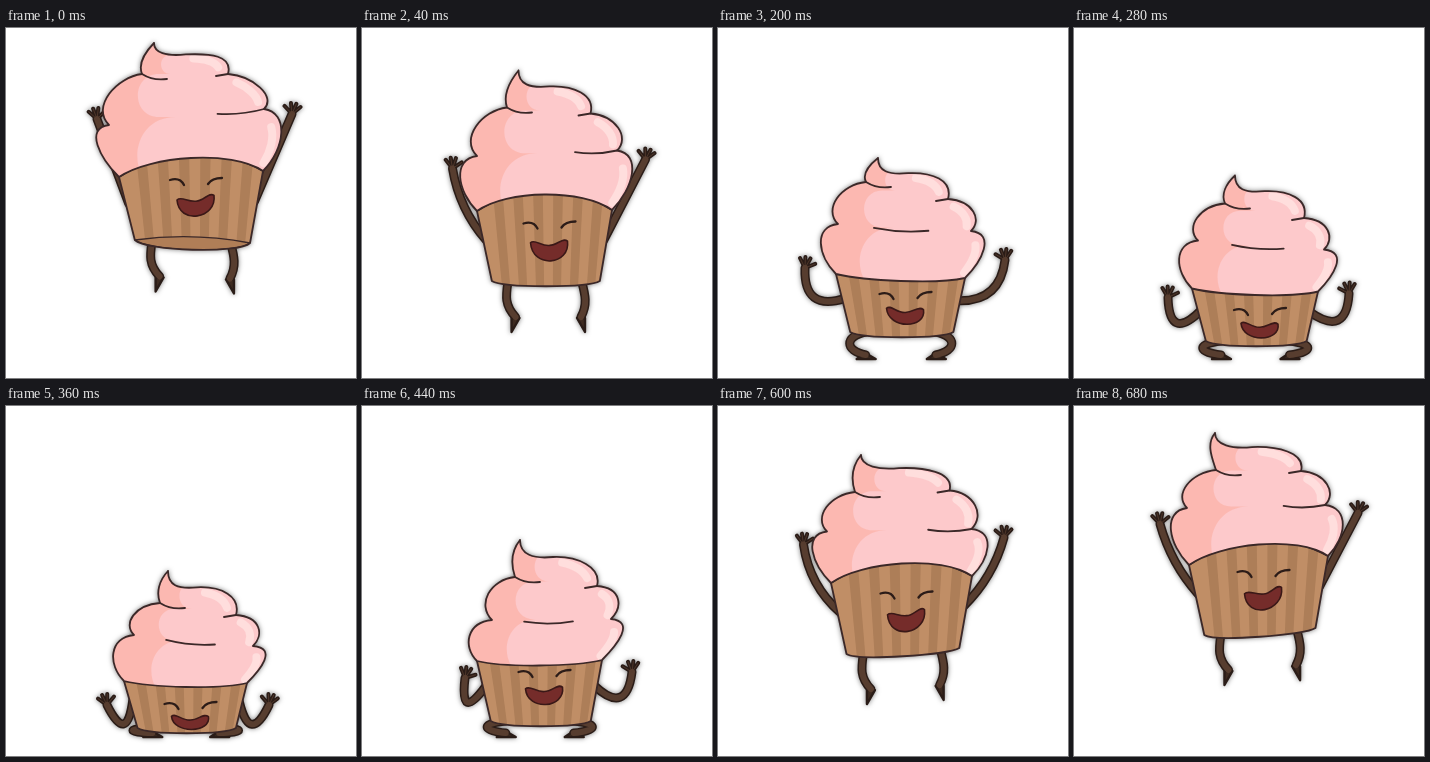
An HTML page that plays this animation: 350x350 px, repeating every 800 ms.

```html
<!DOCTYPE html>
<html lang="en">
<head>
<meta charset="utf-8">
<title>Jumping cupcake</title>
<style>
html, body { margin: 0; width: 100%; height: 100%; overflow: hidden; background: #fff; }
svg { display: block; width: 100%; height: 100%; }
#cake { filter: drop-shadow(0 0 2.8px rgba(0, 0, 0, .5)); }
path { stroke-linecap: round; stroke-linejoin: round; }
.line { fill: none; stroke: #3b2828; stroke-width: 1.8; }
.edge { fill: none; stroke: #2a1c17; }
.skin { fill: none; stroke: #573d2f; }
.shine { fill: none; stroke: #ffdedd; stroke-width: 8; stroke-dasharray: 50 300; stroke-dashoffset: -30; }
</style>
</head>
<body>
<svg viewBox="0 0 350 350">
  <defs>
    <clipPath id="iceClip"><path id="iceMask"/></clipPath>
    <clipPath id="cupClip"><path id="cupMask"/></clipPath>
  </defs>
  <g id="cake">
    <path id="limbEdge" class="edge" stroke-width="9"/>
    <path id="tipEdge" class="edge" stroke-width="4"/>
    <path id="feet" stroke="#2a1c17" stroke-width="2.4" fill="#3d2a20"/>
    <path id="limbSkin" class="skin" stroke-width="6"/>
    <path id="tipSkin" class="skin" stroke-width=".8"/>
    <path id="cup" fill="#c08e66"/>
    <g clip-path="url(#cupClip)">
      <path id="stripes" fill="#ad7e58"/>
      <path id="rim" fill="#b07e57" stroke="#3b2828" stroke-width="1.4"/>
    </g>
    <path id="cupLine" class="line"/>
    <path id="ice" fill="#fcb8b1"/>
    <g clip-path="url(#iceClip)">
      <path id="light" fill="#fdc9cb"/>
      <g transform="translate(-9 4)">
        <path id="shine0" class="shine" pathLength="100"/>
        <path id="shine1" class="shine" pathLength="100"/>
        <path id="shine2" class="shine" pathLength="100"/>
      </g>
    </g>
    <path id="iceLine" class="line"/>
    <path id="crease" class="line"/>
    <path id="eyes" class="line" style="stroke-width:2.3;stroke:#2c1c18"/>
    <path id="mouth" fill="#752c2a" stroke="#3a1817" stroke-width="1.6"/>
  </g>
</svg>
<script>
// right, left: the two notches between the icing tiers, upper one first
// cup: top left, top right, height of each side; hands: both palms
const peak = {
  tip: [148, 15], right: [222, 46, 258, 81], left: [136, 46, 103, 97],
  cup: [113, 149, 257, 143, 63, 72], hands: [91, 91, 286, 86], eyes: [154]
};
const land = {
  tip: [165, 70], right: [235, 125, 252, 164], left: [154, 113, 127, 159],
  cup: [117, 217, 243, 221, 77, 70], hands: [90, 190, 281, 177], eyes: [241]
};
const squat = {
  tip: [160, 130], right: [230, 171, 253, 203], left: [148, 154, 120, 196],
  cup: [118, 246, 247, 250, 58, 54], hands: [87, 240, 287, 232], eyes: [268]
};
const crouch = {
  tip: [162, 165], right: [230, 209, 247, 240], left: [154, 197, 128, 229],
  cup: [118, 275, 241, 277, 47, 45], hands: [101, 299, 263, 299], eyes: [300]
};
const push = {
  tip: [158, 134], right: [235, 180, 249, 213], left: [153, 171, 130, 214],
  cup: [115, 255, 240, 254, 60, 61], hands: [103, 272, 270, 266], eyes: [268]
};
const leap = {
  tip: [145, 71], right: [236, 104, 256, 147], left: [132, 108, 105, 149],
  cup: [111, 195, 254, 190, 72, 72], hands: [85, 159, 288, 156], eyes: [211]
};
const hang = {
  tip: [141, 27], right: [227, 65, 251, 99], left: [142, 64, 113, 102],
  cup: [115, 159, 254, 150, 70, 72], hands: [86, 118, 284, 107], eyes: [168]
};

const mid = (a, b) => (a + b) / 2;
const mix = (a, b, u) => a + (b - a) * u;
const clamp = v => Math.max(0, Math.min(1, v));
const add = (p, x, y) => [p[0] + x, p[1] + y];
const move = p => 'M' + p;
const curve = (...pts) => (pts.length > 2 ? 'C' : 'Q') + pts.join(' ');
const el = id => document.getElementById(id);
const draw = (d, ...ids) => ids.forEach(id => el(id).setAttribute('d', d));

function blend(a, b) {
  const out = {};
  for (const key in a) out[key] = a[key].map((v, i) => mid(v, b[key][i]));
  return out;
}

const steps = [
  [0, peak], [40, blend(peak, land)], [120, land], [200, squat], [280, blend(squat, crouch)],
  [360, crouch], [440, push], [520, leap], [600, blend(leap, hang)], [680, hang]
];

// Named points of the body; lift tells how far the cup is seen from below
function build(p) {
  const [x0, y0, x1, y1, hl, hr] = p.cup, w = x1 - x0;
  const tl = [x0, y0], tr = [x1, y1];
  const bl = [x0 + w * .11, y0 + hl], br = [x1 - w * .09, y1 + hr];
  const base = mid(bl[1], br[1]);
  const lift = clamp((292 - base) / 28);
  return {
    tip: p.tip, tl, tr, bl, br, w, lift,
    rights: [p.right.slice(0, 2), p.right.slice(2), tr],
    lefts: [p.left.slice(0, 2), p.left.slice(2), tl],
    hands: [p.hands.slice(0, 2), p.hands.slice(2)],
    height: mid(hl, hr), arch: 5 - 21 * lift, rim: clamp((222 - base) / 6),
    face: [mid(x0, x1) + 5, p.eyes[0]], tilt: (y1 - y0) * .3
  };
}

// The arm bends outwards by the length that the reach leaves over
function arm(from, hand, side) {
  const dx = hand[0] - from[0], dy = hand[1] - from[1], d = Math.hypot(dx, dy);
  const bow = .55 * Math.sqrt(Math.max(0, 82 * 82 - d * d)) / d;
  const elbow = [mid(from[0], hand[0]) - side * dy * bow, mid(from[1], hand[1]) + side * dx * bow];
  const dir = Math.atan2(hand[1] - elbow[1], hand[0] - elbow[0]);
  const fingers = [-.5, 0, .48, -1.15 * side].map(turn => move(hand) +
    'L' + add(hand, 11 * Math.cos(dir + turn), 11 * Math.sin(dir + turn)));
  return { limb: move(from) + curve(elbow, hand), fingers: fingers.join('') };
}

// Knees bow out while the feet stand; in the air the legs dangle
function leg(hip, side) {
  const gap = 327 - hip[1];
  if (gap > 52) {
    const ankle = add(hip, 3.5 - side * 4, 36);
    return {
      limb: move(hip) + curve(add(hip, 1 + side * 3, 14), add(hip, 1 + side * 5, 24), ankle),
      foot: move(add(ankle, -4, 1)) + 'L' + add(ankle, side * 4, 15) + 'L' + add(ankle, 4, 1) + 'Z'
    };
  }
  const bow = side * Math.sqrt(Math.max(0, 40 * 40 - gap * gap)) * .65;
  const ankle = [hip[0], 327];
  return {
    limb: move(hip) + curve(add(hip, bow, gap * .2), add(ankle, bow, -gap * .2), ankle),
    foot: move(add(ankle, -3, 0)) + 'L' + add(ankle, -9, 4) + 'L' + add(ankle, 10, 4) + 'L' + add(ankle, 3, 0) + 'Z'
  };
}

function drawLimbs(b) {
  const at = (p, q, u) => [mix(p[0], q[0], u), mix(p[1], q[1], u)];
  const arms = [arm(add(at(b.tl, b.bl, .42), 3, 0), b.hands[0], -1),
    arm(add(at(b.tr, b.br, .42), -3, 0), b.hands[1], 1)];
  const legs = [leg(at(b.bl, b.br, .15), -1), leg(at(b.bl, b.br, .83), 1)];
  draw([...arms, ...legs].map(l => l.limb).join(''), 'limbEdge', 'limbSkin');
  draw(arms.map(a => a.fingers).join(''), 'tipEdge', 'tipSkin');
  draw(legs.map(l => l.foot).join(''), 'feet');
}

function drawCup(b) {
  const { tl, tr, bl, br } = b, sag = 7 + b.rim * 4;
  const base = curve(add(br, -11, sag), add(bl, 11, sag), bl);
  const top = [mid(tl[0], tr[0]), mid(tl[1], tr[1]) + b.arch * 2 - 10];
  draw(move(tl) + curve(top, tr) + 'L' + br + base + 'Z', 'cup', 'cupMask', 'cupLine');

  let bands = '';
  for (let u = .1; u < .95; u += .155) {
    const x = (p, q, v) => mix(p[0], q[0], v);
    bands += `M${x(tl, tr, u)} ${top[1]}H${x(tl, tr, u + .075)}` +
      `L${x(bl, br, u + .075)} ${bl[1] + 12}H${x(bl, br, u)}Z`;
  }
  draw(bands, 'stripes');
  draw(move(bl) + curve([mid(bl[0], br[0]), bl[1] - 8], br) + base + 'Z', 'rim');
  el('rim').setAttribute('opacity', b.rim);
}

// One side of an icing tier, from its upper to its lower notch
function lobe(up, low, side) {
  const h = low[1] - up[1];
  return [up, add(up, 25 * side, h * .06), add(low, .36 * h * side, -.36 * h), low];
}

function drawIce(b) {
  const { tip, rights: [r1, r2, r3], lefts: [l1, l2, l3] } = b;
  const dy = r1[1] - tip[1], rise = l1[1] - tip[1];
  const crest = [mix(tip[0], r1[0], .43), mix(tip[1], r1[1], .37)];
  const hem = b.arch * 4 / 3;
  const sides = [
    [crest, add(crest, 24, -1), add(r1, 5, -19), r1],
    lobe(r1, r2, 1), lobe(r2, r3, 1)
  ];
  const shape = move(tip) + curve(add(tip, 0, dy * .32), add(crest, -20, 2), crest) +
    sides.map(s => curve(...s.slice(1))).join('') +
    curve(add(r3, -b.w * .22, hem), add(l3, b.w * .22, hem), l3) +
    [lobe(l2, l3, -1), lobe(l1, l2, -1)].map(s => curve(s[2], s[1], s[0])).join('') +
    curve(add(l1, -4, -rise * .33), add(tip, -9, rise * .3), tip);
  draw(shape, 'ice', 'iceMask', 'iceLine');
  sides.forEach((s, i) => draw(move(s[0]) + curve(...s.slice(1)), 'shine' + i));

  const fold = u => [mix(l2[0], r2[0], u), mix(l2[1], r2[1], u) + 2 * (1 - b.lift)];
  const from = .27 + .43 * b.lift, to = .68 + .32 * b.lift;
  draw(move(l1) + curve(add(l1, 11, 7), add(l1, 25, 5)) +
    move(fold(from)) + curve(add(fold(mid(from, to)), 0, 4), fold(to)) +
    move(r1) + curve(add(r1, -6, 1), add(r1, -12, 2)), 'crease');

  const starts = [l1[0] + 18, mid(l1[0], l2[0]) + 10, mid(l2[0], l3[0]) + 19];
  const levels = [tip[1] + 12, mid(l1[1], r1[1]), mid(l2[1], r2[1]), Math.max(l3[1], r3[1]) + 18];
  draw(starts.map((x, i) => {
    const y = levels[i], low = levels[i + 1], r = (low - y) * .55;
    return `M310 ${y}H${x + r}` + curve([x - r * .2, y], [x - r * .2, low], [x + r, low]) + 'H310Z';
  }).join(''), 'light');
}

function drawFace(b) {
  const c = b.face, drop = b.height * .24, deep = b.height * .33;
  draw(move(add(c, -26, -2)) + 'q10 -3 14 5' + move(add(c, 12, 2)) + 'q4 -6 14 -6', 'eyes');
  const m = add(c, 0, drop), a = add(m, -19, -b.tilt), z = add(m, 19, b.tilt);
  draw(move(a) + curve(add(a, 4, -4), add(m, -8, 4), add(m, 0, 3)) +
    curve(add(m, 8, 3), add(z, -6, -5), add(z, -1, -1)) +
    curve(add(z, 2, deep), add(a, 2, deep + 3), a) + 'Z', 'mouth');
}

let shown;
function tick() {
  const t = performance.now() % 800;
  const pose = steps.filter(s => s[0] <= t).pop()[1];
  if (pose !== shown) {
    shown = pose;
    const body = build(pose);
    [drawLimbs, drawCup, drawIce, drawFace].forEach(part => part(body));
  }
  requestAnimationFrame(tick);
}
tick();
</script>
</body>
</html>
```
